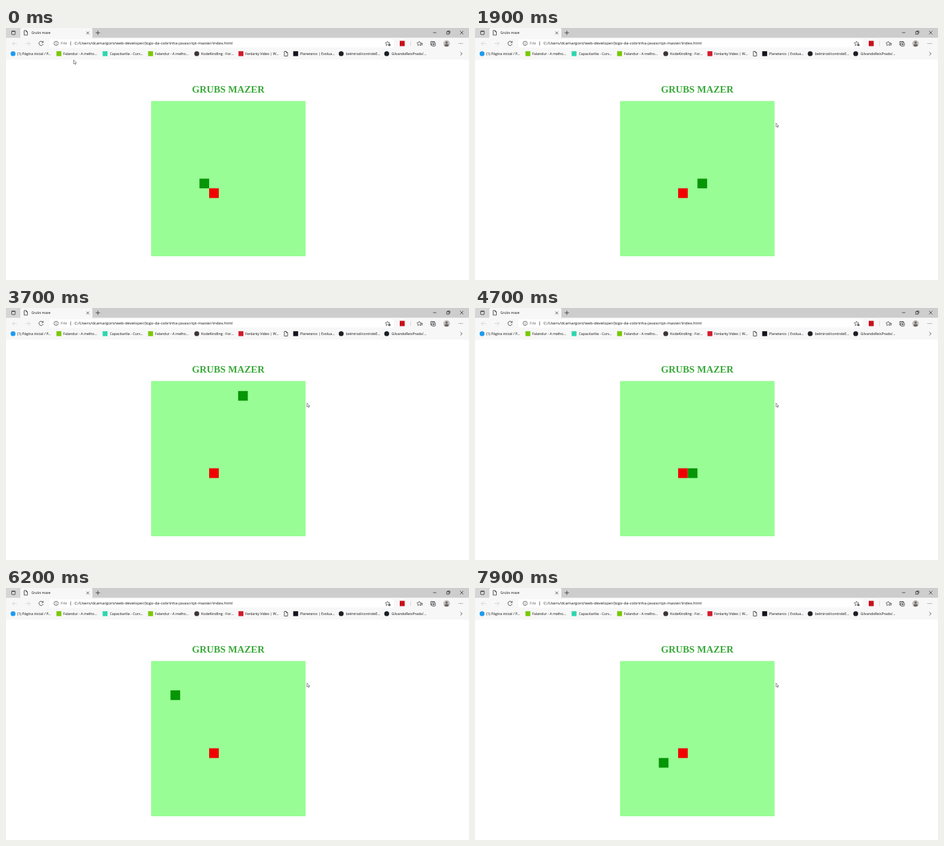
These frames come from a looping animation (702 by 382 pixels, 8000 ms). An HTML page:

```html
<!DOCTYPE html>
<html lang="pt">
<head>
<meta charset="utf-8">
<title>Grubs maze</title>
<style>
  html, body { margin: 0; height: 100%; overflow: hidden; background: #fff; }
  svg { display: block; }
  text { font: 5.3px "Open Sans", sans-serif; fill: #111; }
  .url { font-size: 6.13px; }
  .tab { font-size: 5.15px; }
  .heading { font: bold 14.8px "Liberation Serif", serif; fill: #3aaa3a; text-anchor: middle; }
  .line { fill: none; stroke: #333; stroke-width: .8; }
  .gray { stroke: #555; }
  .pale { stroke: #d0d0d0; }
</style>
</head>
<body>
<svg width="702" height="382" viewBox="0 0 702 382">
  <defs>
    <path id="page" class="line" d="M.5 .5h3l2 2v5h-5zM3.5 .5v2h2"/>
  </defs>

  <!-- tab strip -->
  <rect width="702" height="15" fill="#cdcdcd"/>
  <rect width="20.500" height="14" fill="#d6d6d6"/>
  <path d="M21.500 15V2q0-2 2-2h105.500q2 0 2 2v13z" fill="#f7f7f7"/>
  <rect x="8.500" y="4.500" width="5.500" height="5.500" rx="1" class="line"/>
  <path d="M8.500 5.300h5.500" class="line"/>
  <use href="#page" x="27" y="3.300"/>
  <text x="38.500" y="9.200" class="tab">Grubs maze</text>
  <path class="line" d="M122 5.500l4 4m0-4l-4 4M136 7.300h6.500m-3.250-3.250v6.500M647.500 7h5M688.500 4.500l5 5m0-5l-5 5M669.500 5.500v-1h3.500v3.500h-1"/>
  <rect x="668.200" y="5.700" width="3.600" height="3.600" class="line"/>

  <!-- toolbar -->
  <rect y="14.700" width="702" height="33.300" fill="#f7f7f7"/>
  <rect x="66" y="17" width="522" height="12.500" rx="2" fill="#fff"/>
  <path class="line pale" d="M16.500 23.500h-7m3-3l-3 3l3 3M29.500 23.500h7m-3-3l3 3l-3 3"/>
  <path class="line" d="M55.800 21.500a3.200 3.200 0 1 0 .5 2.500M56.300 19.700v2.300h-2.300"/>
  <circle cx="76" cy="23.300" r="3.200" class="line gray"/>
  <path class="line gray" d="M76 22.800v2.200M76 21.200v.7M98 20.500v6"/>
  <text x="83" y="25.200" class="url" style="fill:#666">File</text>
  <text x="104" y="25.200" class="url">C:/Users/dcamargoni/web-developer/Jogo-da-cobrinha-javascript-master/index.html</text>
  <path id="star" class="line gray" d="M578.500 20l1 2.200 2.500.3-1.800 1.700.4 2.400-2.100-1.200-2.200 1.200.4-2.400-1.800-1.700 2.500-.3z"/>
  <circle cx="581.500" cy="25.800" r="1.700" fill="#666"/>
  <rect x="597" y="19.500" width="7.500" height="8" fill="#c8101c"/>
  <path class="line pale" d="M613.500 20v7"/>
  <use href="#star" x="48"/>
  <path class="line" d="M629 23.500h3M629 25.500h3M645.500 26h-1.500v-5.500h5.500v1.500"/>
  <rect x="645.700" y="22" width="5.300" height="5.300" rx="1" class="line"/>
  <path class="line" d="M646.800 24.650h3.100m-1.550-1.550v3.100"/>
  <circle cx="668" cy="23.500" r="5" fill="#c5c2c0"/>
  <circle cx="668" cy="22" r="1.800" fill="#6b6663"/>
  <path d="M664.700 27q0-2.700 3.300-2.700t3.300 2.700q-3.300 2.600-6.600 0z" fill="#6b6663"/>
  <path class="line" stroke-dasharray="1 1.500" d="M686.500 23.500h6.500"/>

  <!-- bookmarks -->
  <g id="bookmarks"></g>
  <use href="#page" x="421.500" y="35"/>
  <path class="line" d="M689 36.500l2.500 2.500-2.500 2.500"/>

  <!-- game -->
  <text x="337" y="98" class="heading">GRUBS MAZER</text>
  <rect x="220" y="110.700" width="234.200" height="235.300" fill="#98fd94"/>
  <rect id="food" width="14.65" height="14.65" fill="#f00000"/>
  <rect id="snake" width="14.65" height="14.65" fill="#079607"/>
  <path id="cursor" d="M.6 .5v6l1.400-1.200 1 2 .9-.4-.9-1.900h1.800z" fill="#fff" stroke="#444" stroke-width=".6"/>
</svg>
<script>
const CELL = 14.65, STEP = 100, STEPS = 80;
const byId = id => document.getElementById(id);

// [icon x, icon colour, round icon, label x, label]
const bookmarks = [
  [7, '#1d9bf0', 1, 17, '(1) Página inicial / P...'],
  [76.5, '#78c800', 0, 87, 'Falandur - A melho...'],
  [146.5, '#2fd6b0', 0, 157.5, 'Capacitarilia - Curs...'],
  [215.5, '#78c800', 0, 226, 'Falandur - A melho...'],
  [285.5, '#3b3338', 1, 296, 'KodeKindling - For...'],
  [352.5, '#d0182c', 0, 363, 'Fenlarky Video | W...'],
  [435.5, '#15131c', 0, 446, 'Planetarco | Evolua...'],
  [504.5, '#1b1f23', 1, 515.5, 'belmirod/controleE...'],
  [573.5, '#1b1f23', 1, 584.5, 'GilvandoReisPrado/...']
];
byId('bookmarks').innerHTML = bookmarks.map(([x, color, round, labelX, label]) =>
  `<rect x="${x}" y="35.2" width="7.4" height="7.4" rx="${round ? 3.7 : 0}" fill="${color}"/>
   <text x="${labelX}" y="40.6">${label}</text>`).join('');

// Turning points as [step, x, y]
const snakePath = [
  [0, 5, 8], [10, 15, 8], [11, 0, 8], [25, 14, 8], [32, 14, 1], [38, 8, 1], [39, 8, 1],
  [40, 7, 2], [48, 7, 10], [54, 1, 10], [61, 1, 3], [68, 8, 3], [75, 8, 10], [79, 4, 10]
];
const cursorPath = [
  [0, 102, 48], [2, 112, 34], [5, 300, 110], [7, 460, 235], [8, 530, 250],
  [9, 563, 242], [10, 571, 216], [11, 571, 203.5], [13, 571, 203.5], [17, 455.7, 143.5]
];

function pointAt(path, step) {
  const i = path.findIndex(p => p[0] > step);
  if (i < 0) return path.at(-1).slice(1);
  const [s0, x0, y0] = path[i - 1], [s1, x1, y1] = path[i];
  const k = (step - s0) / (s1 - s0);
  return [x0 + (x1 - x0) * k, y0 + (y1 - y0) * k];
}

const place = (id, x, y) => byId(id).setAttribute('transform', `translate(${x} ${y})`);
const placeCell = (id, [col, row]) => place(id, 220.1 + col * CELL, 111.2 + row * CELL);

function draw(now) {
  const step = Math.floor(now / STEP) % STEPS;
  placeCell('snake', pointAt(snakePath, step));
  place('cursor', ...pointAt(cursorPath, step));
  requestAnimationFrame(draw);
}

placeCell('food', [6, 9]);
draw(performance.now());
</script>
</body>
</html>
```
